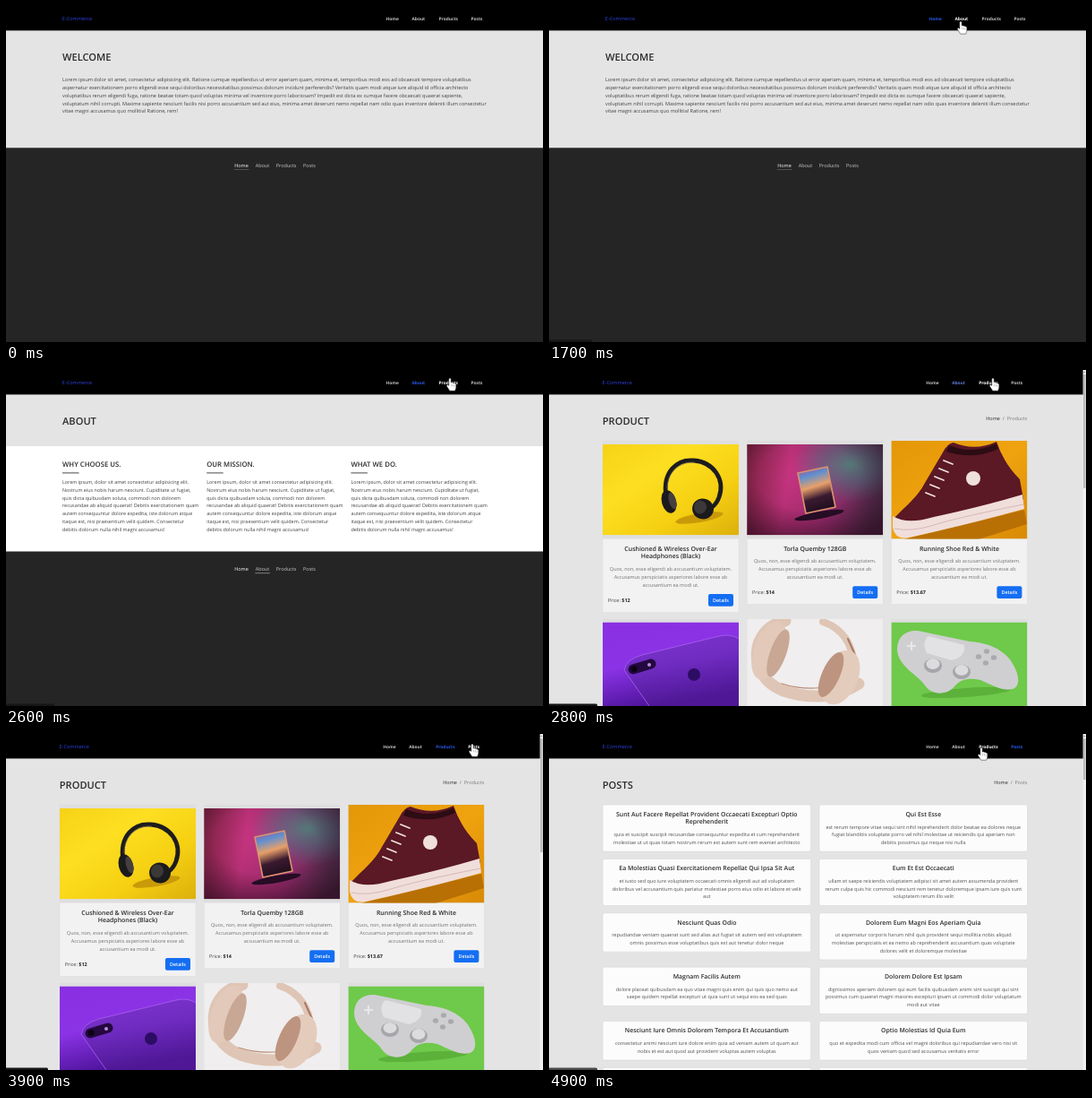
These frames come from a looping animation (600 px wide and 375 px high, 5 s). An HTML page:

```html
<!DOCTYPE html>
<html lang="en">
<head>
<meta charset="utf-8">
<title>Shop walkthrough</title>
<style>
  html, body { margin: 0; width: 100%; height: 100%; overflow: hidden; background: #000; }
  #stage { display: block; width: 100%; height: 100%; }
  text { font-family: "Open Sans", "Noto Sans", sans-serif; text-rendering: geometricPrecision; white-space: pre; }
</style>
</head>
<body>
<svg id="stage" viewBox="0 0 600 375"></svg>
<script>
const LOOP = 5000, STEP = 100, LEAD = 8;
const LINE = 8.78, PAPER = '#e4e4e5', DARK = '#262526', INK = '#404042';
const stage = document.getElementById('stage');

const rect = (x, y, w, h, fill, more = '') =>
  `<rect x="${x}" y="${y}" width="${w}" height="${h}" fill="${fill}" ${more}/>`;
const path = (d, fill, more = '') => `<path d="${d}" fill="${fill}" ${more}/>`;
const line = (d, color, width, more = '') =>
  path(d, 'none', `stroke="${color}" stroke-width="${width}" stroke-linecap="round" ${more}`);
const oval = (x, y, rx, ry, fill, turn = 0) =>
  `<ellipse cx="${x}" cy="${y}" rx="${rx}" ry="${ry}" fill="${fill}" transform="rotate(${turn} ${x} ${y})"/>`;
const text = (x, y, s, size = 5.5, fill = INK, weight = 400, anchor = 'start', more = '') =>
  `<text x="${x}" y="${y}" font-size="${size}" fill="${fill}" font-weight="${weight}" text-anchor="${anchor}" ${more}>${s.replace(/& /g, '&amp; ')}</text>`;
const lines = (x, y, rows, size, fill, weight, anchor) =>
  rows.map((s, i) => text(x, y + i * LINE, s, size, fill, weight, anchor)).join('');
const heading = (x, s) => text(x, 60.9, s, 11.1, '#2b2b2d', 600);
const stops = colors => colors.map((c, i) => `<stop offset="${i / (colors.length - 1)}" stop-color="${c}"/>`).join('');
const gradient = (id, colors, coords = 'x2="1" y2="1"') =>
  `<linearGradient id="${id}" ${coords}>${stops(colors)}</linearGradient>`;
const glow = (id, cx, cy, r, colors) =>
  `<radialGradient id="${id}" cx="${cx}" cy="${cy}" r="${r}">${stops(colors)}</radialGradient>`;
// A picture clipped to its own box, drawn in stage coordinates
const photo = (x, y, w, h, fills, ...parts) =>
  `<svg x="${x}" y="${y}" width="${w}" height="${h}" viewBox="${x} ${y} ${w} ${h}">` +
  fills.map(f => rect(x, y, w, h, f)).join('') + parts.join('') + '</svg>';

const NAV = [['Home', 424.5, 439], ['About', 453.5, 469], ['Products', 483.5, 505], ['Posts', 519.5, 532]];

function footer(top, current) {
  const xs = [255.2, 278.7, 301.8, 332], ends = [271, 294.5, 324.5, 345.5];
  return rect(0, top, 600, 375 - top, DARK) +
    NAV.map(([s], i) => text(xs[i], top + 21.4, s, 5.5, i ? '#c9c9c9' : '#fff', i ? 400 : 500)).join('') +
    line(`M${xs[current]} ${top + 24.2}H${ends[current]}`, current ? '#bbb' : '#7a6a6a', 0.6);
}

function homePage() {
  return rect(0, 27, 600, 132, PAPER) + heading(63, 'WELCOME') + lines(63, 84.3, [
    'Lorem ipsum dolor sit amet, consectetur adipisicing elit. Ratione cumque repellendus ut error aperiam quam, minima et, temporibus modi eos ad obcaecati tempore voluptatibus',
    'aspernatur exercitationem porro eligendi esse sequi doloribus necessitatibus possimus dolorum incidunt perferendis? Veritatis quam modi atque iure aliquid id officia architecto',
    'voluptatibus rerum eligendi fuga, ratione beatae totam quod voluptas minima vel inventore porro laboriosam? Impedit est dicta ex cumque facere obcaecati quaerat sapiente,',
    'voluptatum nihil corrupti. Maxime sapiente nesciunt facilis nisi porro accusantium sed aut eius, minima amet deserunt nemo repellat nam odio quas inventore deleniti illum consectetur',
    'vitae magni accusamus quo mollitia! Ratione, rem!'
  ], 5.53) + footer(158.3, 0);
}

function aboutPage() {
  const body = [
    'Lorem ipsum, dolor sit amet consectetur adipisicing elit.',
    'Nostrum eius nobis harum nesciunt. Cupiditate ut fugiat,',
    'quis dicta quibusdam soluta, commodi non dolorem',
    'recusandae ab aliquid quaerat! Debitis exercitationem quam',
    'autem consequuntur dolore expedita, iste dolorum atque',
    'itaque est, nisi praesentium velit quidem. Consectetur',
    'debitis dolorum nulla nihil magni accusamus!'
  ];
  const column = (s, i) => {
    const x = 63 + i * 161.2;
    return text(x, 107.9, s, 7.75, '#2b2b2d', 600) + rect(x, 114.4, 18.5, 1, '#4a4a4a') + lines(x, 127.1, body, 5.43);
  };
  return rect(0, 27, 600, 58, PAPER) + rect(0, 85, 600, 118, '#fff') + heading(63, 'ABOUT') +
    ['WHY CHOOSE US.', 'OUR MISSION.', 'WHAT WE DO.'].map(column).join('') + footer(202.5, 1);
}

function crumbs(s) {
  return text(534.4, 55.5,
    `<tspan fill="#2b2b2d">Home</tspan><tspan dx="2.9">/</tspan><tspan dx="2.9">${s}</tspan>`,
    5.5, '#77797d', 400, 'end');
}

const scrollbar = bottom =>
  rect(596.6, 0, 3.4, 375, '#f1f1f1') + rect(597, 5, 2.6, bottom - 5, '#b9b9b9') +
  path('M597.3 3L598.3 1.6L599.3 3Z', '#777');

const photos = [
  photo(60, 83, 152, 101.3, ['url(#yellow)'],
    oval(168, 165, 27, 5, '#c99a08', -10),
    line('M131 142C126 113 144 99 162 101C184 103 197 122 190 142Q187 150 181 154', '#1d1c1e', 4.8),
    line('M132 132C132 113 147 102 162 103', '#6b645a', 0.8),
    oval(134, 147, 8, 13, '#1b1a1c', -16), oval(138, 146, 4, 9.5, '#45403f', -16),
    oval(172, 155, 12, 11.5, '#1b1a1c', 20), oval(169, 153, 7, 7.5, '#3b3838', 20)),
  photo(221.2, 83, 152, 101.3, ['url(#neon)', 'url(#teal)', 'url(#shade)'],
    oval(302, 162, 28, 4, '#260c24', -10),
    path('M278 115L311 108L320 153L287 160Z', 'url(#screen)', 'stroke="#d9946e" stroke-width="1.6" stroke-linejoin="round"')),
  photo(382.4, 79, 152, 109.5, ['url(#orange)'],
    path('M396 189L531 156L534 172L480 189Z', '#b87004'),
    path('M385 166C398 152 412 142 420 126L440 92Q445 82 452 81Q476 91 500 80Q508 104 526 122L530 144L395 178Z', '#5b1825'),
    path('M447 84Q474 95 500 82L502 88Q474 101 444 91Z', '#2d0c14'),
    path('M384 163Q400 173 430 164Q485 152 529 139L531 155Q470 172 402 187Q387 190 384 176Z', '#f0dedb'),
    line('M386 177Q405 181 430 173T530 150', '#c9a8a4', 0.7),
    ...[0, 1, 2, 3, 4].map(i => line(`M${421 + i * 5} ${137 - i * 9}l10 4`, '#efe0dc', 1.8)),
    oval(474, 121, 8, 8, '#efe0dc')),
  photo(60, 281.5, 152, 94, ['url(#violet)'],
    path('M84 335Q86 323 104 318L190 297Q204 294 212 300V375H112Z', 'url(#shell)'),
    line('M112 375L84 335Q86 323 104 318L190 297Q204 294 212 300', '#a962ee', 0.8),
    line('M94 334L114 328', '#24083f', 11), oval(95, 333.5, 3.6, 3.6, '#0c0318'), oval(112, 329, 2, 2, '#b98ae0'),
    oval(162, 340, 7, 7, '#2c0d63')),
  photo(221.2, 278, 152, 97, ['#f0eeef'],
    line('M264 280C224 288 220 342 262 358C292 368 322 366 346 350', '#dfc5b5', 13),
    line('M260 350C288 359 318 356 338 343', '#b98d76', 1.2),
    line('M306 281Q338 292 341 330', '#dfc5b5', 8), line('M334 300L342 318', '#a97862', 2),
    oval(246, 313, 17, 34, '#e2c9ba', 20), oval(256, 316, 9, 28, '#c8a794', 20),
    oval(325, 343, 20, 32, '#e4ccbd', 24), oval(315, 340, 10, 27, '#bd947f', 24)),
  photo(382.4, 281.5, 152, 94, ['#6fc94a'],
    oval(466, 360, 50, 5, '#5bb139', -4),
    path('M389 312C389 298 398 290 412 291L470 303C490 304 508 312 517 326C527 342 526 353 518 356C506 359 494 351 482 346C470 343 460 345 454 352C446 363 428 364 420 352C412 340 390 331 389 312Z', '#cfcfd1'),
    path('M424 297L464 307Q466 320 450 324L422 316Q416 304 424 297Z', '#e2e2e4'),
    ...[[429, 328], [461, 335]].map(([x, y]) => oval(x, y + 2, 10, 8, '#a6a6aa') + oval(x, y, 7.5, 6, '#dcdcde')),
    line('M401 308h8M405 304v8', '#e8e8ea', 2.2),
    ...[[489, 314], [497, 321], [488, 327], [480, 320]].map(([x, y]) => oval(x, y, 3.2, 2.8, '#aaaaae')))
];

function productCard(col, title, price) {
  const x = 60 + col * 161.2, mid = x + 76, drop = (title.length - 1) * LINE;
  return rect(x, 79, 152, 182.5 + drop, '#f2f2f3', 'stroke="#d9d9da" stroke-width=".4"') +
    rect(x, 79, 152, 109.5, '#dededf') + photos[col] +
    lines(mid, 201.7, title, 6.95, '#2b2b2d', 600, 'middle') +
    lines(mid, 215.2 + drop, [
      'Quos, non, esse eligendi ab accusantium voluptatem.',
      'Accusamus perspiciatis asperiores labore esse ab',
      'accusantium ea modi ut.'
    ], 5.5, '#727274', 400, 'middle') +
    text(x + 5.8, 250 + drop, `Price: <tspan font-weight="700" fill="#222">${price}</tspan>`) +
    rect(x + 118, 241.2 + drop, 28, 13.8, '#146ef2', 'rx="2"') +
    text(x + 132, 250 + drop, 'Details', 5.4, '#fff', 600, 'middle');
}

function productsPage() {
  return rect(0, 27, 600, 348, PAPER) + heading(59.8, 'PRODUCT') + crumbs('Products') +
    productCard(0, ['Cushioned & Wireless Over-Ear', 'Headphones (Black)'], '$12') +
    productCard(1, ['Torla Quemby 128GB'], '$14') +
    productCard(2, ['Running Shoe Red & White'], '$13.67') +
    [0, 1, 2].map(i => rect(60 + i * 161.2, 278, 152, 97, '#dededf') + photos[i + 3]).join('');
}

const POSTS = [
  ['Sunt Aut Facere Repellat Provident Occaecati Excepturi Optio|Reprehenderit',
    'quia et suscipit suscipit recusandae consequuntur expedita et cum reprehenderit|molestiae ut ut quas totam nostrum rerum est autem sunt rem eveniet architecto'],
  ['Qui Est Esse',
    'est rerum tempore vitae sequi sint nihil reprehenderit dolor beatae ea dolores neque|fugiat blanditiis voluptate porro vel nihil molestiae ut reiciendis qui aperiam non|debitis possimus qui neque nisi nulla'],
  ['Ea Molestias Quasi Exercitationem Repellat Qui Ipsa Sit Aut',
    'et iusto sed quo iure voluptatem occaecati omnis eligendi aut ad voluptatem|doloribus vel accusantium quis pariatur molestiae porro eius odio et labore et velit|aut'],
  ['Eum Et Est Occaecati',
    'ullam et saepe reiciendis voluptatem adipisci sit amet autem assumenda provident|rerum culpa quis hic commodi nesciunt rem tenetur doloremque ipsam iure quis sunt|voluptatem rerum illo velit'],
  ['Nesciunt Quas Odio',
    'repudiandae veniam quaerat sunt sed alias aut fugiat sit autem sed est voluptatem|omnis possimus esse voluptatibus quis est aut tenetur dolor neque'],
  ['Dolorem Eum Magni Eos Aperiam Quia',
    'ut aspernatur corporis harum nihil quis provident sequi mollitia nobis aliquid|molestiae perspiciatis et ea nemo ab reprehenderit accusantium quas voluptate|dolores velit et doloremque molestiae'],
  ['Magnam Facilis Autem',
    'dolore placeat quibusdam ea quo vitae magni quis enim qui quis quo nemo aut|saepe quidem repellat excepturi ut quia sunt ut sequi eos ea sed quas'],
  ['Dolorem Dolore Est Ipsam',
    'dignissimos aperiam dolorem qui eum facilis quibusdam animi sint suscipit qui sint|possimus cum quaerat magni maiores excepturi ipsam ut commodi dolor voluptatum|modi aut vitae'],
  ['Nesciunt Iure Omnis Dolorem Tempora Et Accusantium',
    'consectetur animi nesciunt iure dolore enim quia ad veniam autem ut quam aut|nobis et est aut quod aut provident voluptas autem voluptas'],
  ['Optio Molestias Id Quia Eum',
    'quo et expedita modi cum officia vel magni doloribus qui repudiandae vero nisi sit|quos veniam quod sed accusamus veritatis error']
];

function postsPage() {
  const box = (x, y, h) => rect(x, y, 232.6, h, '#fcfcfc', 'rx="2" stroke="#d3d3d4" stroke-width=".5"');
  const card = ([title, body], i) => {
    const x = i % 2 ? 302 : 60, y = 79 + (i >> 1) * 60.4, mid = x + 116.3;
    const head = title.split('|'), rows = body.split('|');
    return box(x, y, 17 + (head.length + rows.length) * LINE) +
      lines(mid, y + 12.7, head, 6.9, '#2b2b2d', 600, 'middle') +
      lines(mid, y + 26.5 + (head.length - 1) * LINE, rows, 5.5, '#525254', 400, 'middle');
  };
  return rect(0, 27, 600, 348, PAPER) + heading(59.8, 'POSTS') + crumbs('Posts') +
    POSTS.map(card).join('') + box(60, 372.4, 20) + box(302, 372.4, 20);
}

stage.innerHTML = '<defs>' +
  gradient('yellow', ['#f6d216', '#fddf22', '#f6d012', '#dcb00c']) +
  gradient('neon', ['#8c2748', '#cc3684', '#a83079', '#5c3558'], 'x2="1" y2=".1"') +
  glow('teal', 0.76, 0.22, 0.42, ['#4f9c8acc', '#4f7f8a88', '#4f7f8a00']) +
  glow('shade', 0.45, 0.35, 0.75, ['#25081800', '#25081822', '#250818b0']) +
  gradient('screen', ['#b5407f', '#5f8fd0', '#e8a06a', '#3a1a30', '#241020'], 'x2=".25" y2="1"') +
  gradient('orange', ['#e39708', '#efa30f', '#d98a06']) +
  gradient('violet', ['#8a2fe2', '#8b33e6', '#4a1296'], 'x2=".4" y2="1"') +
  gradient('shell', ['#7f36d2', '#6f2bc0', '#4f1796'], 'x2=".3" y2="1"') + '</defs>' +
  [homePage, aboutPage, productsPage, postsPage].map(p => `<g class="page">${p()}</g>`).join('') +
  rect(0, 0, 600, 27.4, '#000') +
  `<g id="bar">${text(62.8, 15.5, 'E-Commerce', 5.6, '#2f42e2')}` +
  NAV.map(([s, x]) => text(x, 15.7, s, 4.85, '#c4c4c4', 700, 'start', 'class="nav"')).join('') + '</g>' +
  `<g class="scroll">${scrollbar(132)}</g><g class="scroll">${scrollbar(51)}</g>` +
  rect(-2, 372.6, 0, 5, '#161617', 'id="status" rx="1.5"') +
  `<g id="arrow">${path('M0 0V11.4L2.7 9L4.5 13L6.3 12.2L4.5 8.3H8.2Z', '#fff', 'stroke="#333" stroke-width=".7" stroke-linejoin="round"')}</g>` +
  `<g id="hand">${path('M-1.2 .9Q0 -.9 1.2 .9V5L2.3 4.8Q3.4 4.7 3.7 5.5Q4.9 5 5.4 6.1Q6.8 5.8 6.9 7.2V10.2Q6.8 12 5.6 14.2H-.3Q-1.4 12.2 -3.5 9.2Q-4.2 7.8 -3 7.4Q-2.2 7.3 -1.2 8.4Z', '#fff', 'stroke="#222" stroke-width=".5"')}${line('M1.6 7V9M3.5 7.3V9.2M5.2 7.7V9.4', '#777', 0.4)}</g>`;

const $ = id => document.getElementById(id);
const all = selector => [...stage.querySelectorAll(selector)];
const pages = all('.page'), links = all('.nav'), scrolls = all('.scroll');
const show = (el, on) => el.setAttribute('display', on ? 'inline' : 'none');

const OPEN = [0, 1900, 2800, 4000];               // when each page shows
const LIT = [900, 1900, 2800, 4000, LOOP + 500];  // when each link turns blue
const FADE = 200, EARLY = 70;
const STATUS = [[800, 1300, 33], [1700, 2200, 48], [2300, 3100, 54], [3300, 4500, 47], [4800, LOOP, 54]];
const CURSOR = [
  [100, 594, 166], [300, 570, 118], [600, 521, 52], [800, 436, 14], [900, 434, 14],
  [1100, 472, 58], [1300, 472, 57], [1700, 460, 17], [1800, 459, 13], [1900, 459, 13],
  [2100, 472, 48], [2400, 493, 12], [2600, 496, 9], [2800, 496, 9], [3000, 510, 52],
  [3300, 522, 15], [3500, 521, 11], [4000, 521, 11], [4200, 535, 133], [4600, 535, 133],
  [4800, 500, 36], [4900, 483, 15], [LOOP, 483, 15]
];

const clamp = v => Math.max(0, Math.min(1, v));
const mix = (a, b, k) => a + (b - a) * k;

function cursorAt(t) {
  const i = CURSOR.findIndex(k => k[0] > t);
  if (i < 1) return null;
  const [t0, x0, y0] = CURSOR[i - 1], [t1, x1, y1] = CURSOR[i];
  const k = (t - t0) / (t1 - t0);
  return [mix(x0, x1, k), mix(y0, y1, k)];
}

function draw(t) {
  const page = OPEN.filter(at => at <= t).length - 1;
  const shift = page > 1 ? -3.3 : 0;
  pages.forEach((p, i) => show(p, i === page));
  scrolls.forEach((s, i) => show(s, i + 2 === page));
  $('bar').setAttribute('transform', `translate(${shift} 0)`);

  const tip = cursorAt(t);
  const over = tip && tip[1] > 7 && tip[1] < 21
    ? NAV.findIndex(([, a, b]) => tip[0] >= a + shift && tip[0] <= b + shift) : -1;
  links.forEach((link, i) => {
    const blue = clamp((t - LIT[i]) / FADE) * (1 - clamp((t - LIT[i + 1] + EARLY) / FADE));
    const base = i === over ? 255 : 196;
    const rgb = [42, 88, 232].map(c => Math.round(mix(base, c, blue)));
    link.setAttribute('fill', `rgb(${rgb})`);
  });

  [['arrow', over < 0], ['hand', over >= 0]].forEach(([id, on]) => {
    show($(id), tip && on);
    if (tip) $(id).setAttribute('transform', `translate(${tip})`);
  });

  const status = STATUS.find(([a, b]) => t >= a && t < b);
  $('status').setAttribute('width', status ? status[2] + 2 : 0);
  $('status').setAttribute('fill', page === 3 ? '#4a4a4c' : '#161617');
}

const start = performance.now();
function tick() {
  const t = (performance.now() - start + LEAD) % LOOP;
  draw(Math.floor(t / STEP) * STEP);
  requestAnimationFrame(tick);
}
tick();
</script>
</body>
</html>
```
